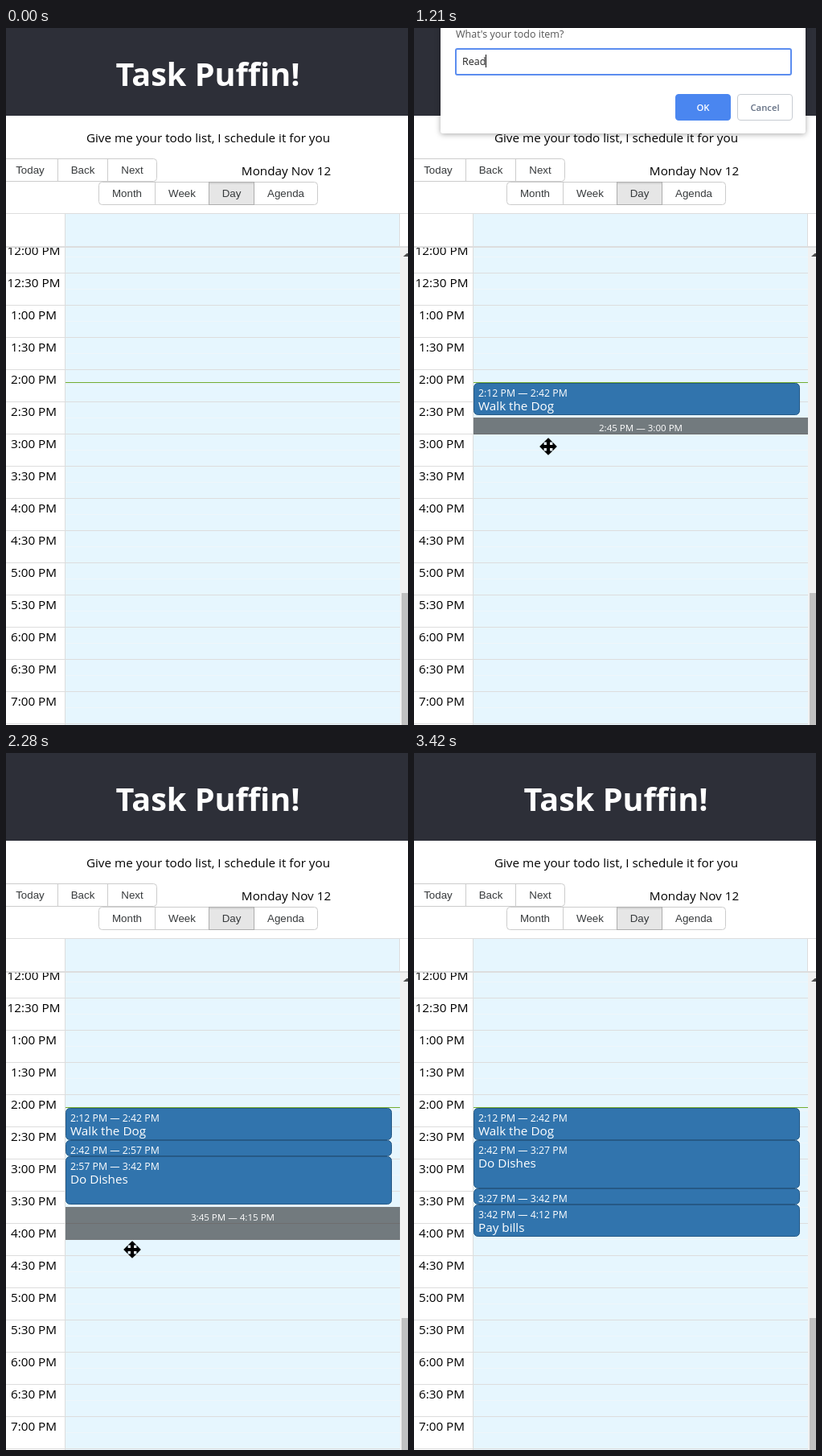
These frames come from a looping animation (500 by 866 pixels, 3.45 s). An HTML page:

```html
<!DOCTYPE html>
<html lang="en">
<head>
<meta charset="utf-8">
<title>Task Puffin</title>
<style>
  html, body { margin: 0; width: 100%; height: 100%; overflow: hidden; background: #fff; }
  body { position: relative; font: 15.25px 'Open Sans', 'Noto Sans', sans-serif; }
  svg { position: absolute; left: 0; top: 0; }
  .mid { text-anchor: middle; }
  .button { font: 13.33px 'Liberation Sans', Arial, sans-serif; fill: #373a3c; text-anchor: middle; }
  .range { font-size: 12.3px; }
  #dialog {
    position: absolute; left: 33px; top: -60px; width: 454px; height: 191px;
    background: #fff; border-radius: 3px; box-shadow: 0 1px 7px rgba(0, 0, 0, .35);
    transform-origin: 50% 100%; color: #555; font-size: 12.5px;
  }
  #dialog > * { position: absolute; box-sizing: border-box; }
  #prompt { left: 19px; top: 59px; line-height: 18px; }
  #field {
    left: 18px; top: 85px; width: 419px; height: 34px; padding: 0 7px;
    border: 2px solid #5b8def; border-radius: 3px; color: #222; line-height: 29px; white-space: pre;
  }
  #field::after { content: ''; display: inline-block; height: 16px; border-left: 1px solid #111; vertical-align: -3px; }
  .choice {
    top: 142px; width: 69px; height: 33px; border: 1px solid #c8ccd2; border-radius: 4px;
    font-size: 11.3px; font-weight: 600; line-height: 31px; text-align: center;
  }
  #ok { left: 292px; background: #4a86f0; border-color: #4a86f0; color: #fff; }
  #cancel { left: 369px; color: #647084; }
</style>
</head>
<body>
<svg width="500" height="866"><g id="page"></g><g id="live"></g></svg>
<div id="dialog">
  <div id="prompt">What's your todo item?</div>
  <div id="field"></div>
  <div id="ok" class="choice">OK</div>
  <div id="cancel" class="choice">Cancel</div>
</div>
<svg width="500" height="866"><g id="pointer"></g></svg>
<script>
const LOOP = 3450, REORDER = 3260, GRAB = 2960, GRAB_Y = 535;
const $ = id => document.getElementById(id);
const clamp = v => Math.max(0, Math.min(1, v));

const rect = (x, y, w, h, fill, extra = '') =>
  `<rect x="${x}" y="${y}" width="${w}" height="${h}" fill="${fill}" ${extra}/>`;
const text = (x, y, str, extra = '') => `<text x="${x}" y="${y}" ${extra}>${str}</text>`;

// Two o'clock sits at y = 424 and a quarter of an hour is 20 px tall.
const minutesAt = y => 120 + (y - 424) * .75;
const clock = m => `${Math.floor(m / 60) || 12}:${String(m % 60).padStart(2, '0')} PM`;
const range = (start, length) => `${clock(start)} — ${clock(start + length)}`;

const tasks = [
  { title: 'Walk the Dog', length: 30, slot: 464, drag: 210, open: 285, type: [370, 520], close: 570 },
  { title: 'Read Mail', length: 15, slot: 484, drag: 950, open: 1015, type: [1140, 1300], close: 1320 },
  { title: 'Do Dishes', length: 45, slot: 504, drag: 1500, open: 1670, type: [1760, 1950], close: 1970 },
  { title: 'Pay bills', length: 30, slot: 564, drag: 2190, open: 2300, type: [2400, 2700], close: 2720 }
];
tasks.forEach(task => task.added = task.close + 40);
const [walk, mail, dishes, bills] = tasks;

// time, x, y, shape from then on
const path = [
  [20, 240, 788, 'arrow'], [190, 168, 472, 'move'], [210, 168, 472, 'move'], [285, 169, 512, 'move'],
  [640, 169, 512, 'arrow'], [920, 162, 505, 'arrow'], [950, 164, 486, 'move'], [1010, 167, 520, 'move'],
  [1390, 167, 520, 'arrow'], [1490, 171, 506, 'move'], [1540, 171, 528, 'move'], [1620, 172, 574, 'move'],
  [2030, 172, 574, 'arrow'], [2180, 172, 574, 'move'], [2280, 157, 617, 'move'], [2720, 157, 617, 'move'],
  [2780, 170, 600, 'hand'], [2830, 183, 585, 'hand'], [2930, 188, GRAB_Y, 'hand'], [GRAB, 188, GRAB_Y, 'hand'],
  [3170, 186, 475, 'hand'], [REORDER, 186, 475, 'arrow'], [3415, 250, 838, 'arrow']
];

const shapes = {
  arrow: '<path d="M0 0V17.5L4 14 7 21 10.5 19.5 7.5 13H12.5Z" stroke="#fff" stroke-width=".7"/>',
  move: rect(-4, -4, 8, 8, '#fff') +
    `<path d="M0-10 4-6H1.5V-1.5H6V-4L10 0 6 4V1.5H1.5V6H4L0 10-4 6H-1.5V1.5H-6V4L-10 0-6-4V-1.5H-1.5V-6H-4Z"
      stroke="#000" stroke-width="1.2"/>`,
  hand: `<path d="M-2 10V1Q0-2 2 1V7L10 9Q11 12 9.5 17H-3L-7 12Q-7 8-2 11Z" fill="#d6934f" stroke="#000" stroke-width="1.4"/>
    <path d="M2 6V11M5 7V11M8 8V11" stroke="#000"/><path d="M-4 16H10L7 21Q3 24-1 21Z"/>`
};

function cursorAt(t) {
  const i = path.findIndex((key, n) => n + 1 < path.length && t >= key[0] && t < path[n + 1][0]);
  if (i < 0) return null;
  const [t0, x0, y0, shape] = path[i], [t1, x1, y1] = path[i + 1];
  const p = (t - t0) / (t1 - t0);
  return { x: x0 + (x1 - x0) * p, y: y0 + (y1 - y0) * p, shape };
}

function buttons(x, y, items) {
  const total = items.reduce((sum, item) => sum + item[1], 0);
  let out = rect(x + .5, y + .5, total, 28, '#fff', 'rx="4" stroke="#ccc"'), left = x;
  items.forEach(([label, width], i) => {
    if (label === 'Day')
      out += rect(left + .5, y + .5, width, 28, '#e6e6e6', 'stroke="#adadad"') +
        rect(left + 1, y + 1, width - 1, 2, '#d5d5d5');
    else if (i && items[i - 1][0] !== 'Day') out += rect(left, y, 1, 29, '#ccc');
    out += text(left + width / 2 + .5, y + 19, label, 'class="button"');
    left += width;
  });
  return out;
}

function drawPage() {
  let out = rect(0, 273, 500, 593, '#fff') + rect(74, 231, 416, 635, '#e6f6fe');
  for (let i = 0; i < 16; i++) {
    const y = 264 + i * 40;
    out += rect(74, y + 20, 416, 1, '#eff6fa') + rect(0, y, 490, 1, '#ddd');
    if (i < 15) out += text(34.5, y + 18, clock(i * 30), 'class="mid"');
  }
  out += rect(0, 231, 500, 41, '#fff') + rect(74, 231, 416, 41, '#e6f6fe') +
    rect(0, 230, 500, 1, '#ddd') + rect(489, 231, 1, 41, '#ddd') +
    rect(0, 271, 500, 2, '#ddd') + rect(73, 231, 1, 635, '#ddd') +
    rect(490, 273, 10, 593, '#f1f1f1') + rect(492, 702, 8, 164, '#c1c1c1') +
    '<path d="M494 284 498.5 280H500V284Z" fill="#505050"/>' +
    rect(74, 440, 416, 1, '#74ad31') +
    rect(0, 0, 500, 109, '#2d2f38') +
    text(251, 72, 'Task Puffin!', 'class="mid" font-size="39.6" font-weight="700" fill="#fff"') +
    text(251.5, 142, 'Give me your todo list, I schedule it for you', 'class="mid"') +
    text(348.5, 183, 'Monday Nov 12', 'class="mid"') +
    buttons(-5, 162, [['Today', 69], ['Back', 62], ['Next', 61]]) +
    buttons(115, 191, [['Month', 70], ['Week', 67], ['Day', 56], ['Agenda', 79]]);
  $('page').innerHTML = out;
}

function eventBox(task, y, start, hovered, opacity = 1) {
  const h = task.length * 4 / 3;
  let out = rect(74.5, y + .5, 405, h - 1, '#3174ad', 'rx="5" stroke="#265985"') +
    text(80, y + 17, range(start, task.length), 'class="range"');
  if (h > 20) out += text(80, y + 34, task.title);
  if (hovered)
    for (const dy of [3, 6, h - 6, h - 3]) out += rect(272, y + dy, 10, 1, '#fff');
  return `<g fill="#fff" opacity="${opacity}">${out}</g>`;
}

function drawEvents(t, cursor) {
  const order = t < REORDER ? tasks : [walk, dishes, mail, bills];
  const dragging = t >= GRAB && t < REORDER;
  let y = 441, start = 132, out = '', preview = '';
  for (const task of order) {
    if (t < task.added) continue;
    const h = task.length * 4 / 3;
    const hovered = !dragging && cursor && cursor.shape === 'hand' && cursor.y >= y && cursor.y < y + h;
    const moved = dragging && task === dishes;
    out += eventBox(task, y, start, hovered, moved ? .5 : 1);
    if (moved) {
      const steps = Math.round((cursor.y - GRAB_Y) / 20);
      preview = eventBox(task, y + steps * 20, start + steps * 15, true, .8);
    }
    y += h;
    start += task.length;
  }
  return out + preview;
}

function drawSelection(t, cursor) {
  const task = tasks.find(task => t >= task.drag && t < task.added);
  if (!task) return '';
  const quarters = Math.max(1, Math.floor((cursor.y - task.slot) / 20));
  return rect(74, task.slot, 416, quarters * 20 + 1, 'rgba(0,0,0,.5)') +
    text(282, task.slot + 17, range(minutesAt(task.slot), quarters * 15),
      'class="mid" font-size="11.55" fill="#fff"');
}

function drawDialog(t) {
  const task = tasks.find(task => t >= task.open && t < task.close + 60);
  $('dialog').style.display = task ? 'block' : 'none';
  if (!task) return;
  const shown = clamp((t - task.open) / 85) * (1 - clamp((t - task.close) / 60));
  const [from, to] = task.type;
  $('dialog').style.opacity = shown;
  $('dialog').style.transform = `perspective(1200px) rotateX(${(1 - shown) * 7}deg)`;
  $('field').textContent = task.title.slice(0, Math.round(clamp((t - from) / (to - from)) * task.title.length));
}

function frame(now) {
  const t = now % LOOP, cursor = cursorAt(t);
  $('live').innerHTML = drawEvents(t, cursor) + drawSelection(t, cursor);
  $('pointer').innerHTML = cursor
    ? `<g transform="translate(${cursor.x.toFixed(1)} ${cursor.y.toFixed(1)})">${shapes[cursor.shape]}</g>` : '';
  drawDialog(t);
  requestAnimationFrame(frame);
}

drawPage();
const begin = performance.now();
requestAnimationFrame(function tick() {
  frame(Math.max(0, performance.now() - begin));
});
</script>
</body>
</html>
```
